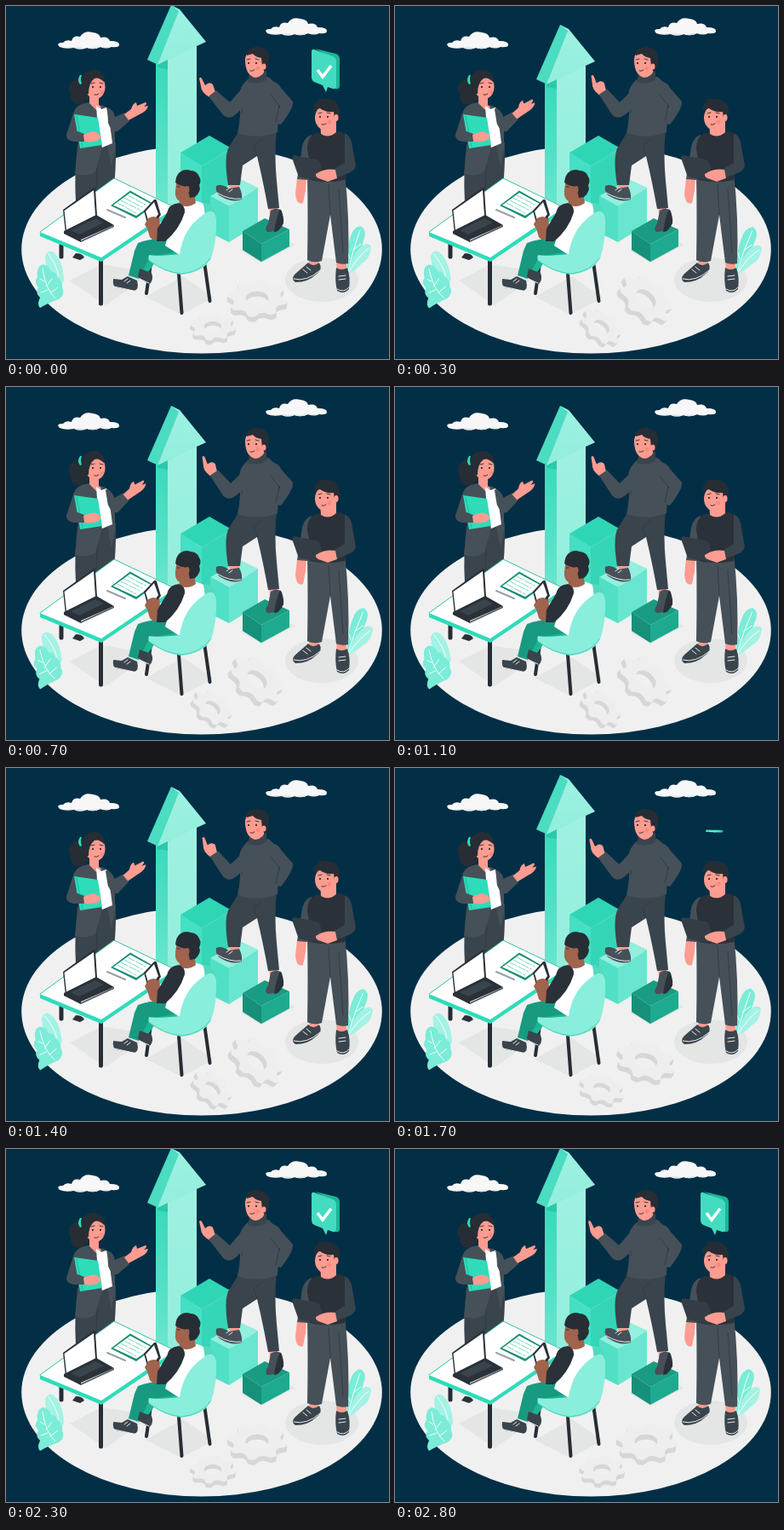
Write an HTML page that moves like this. It is 450 by 414 pixels and loops after 2900 ms.

```html
<!DOCTYPE html>
<html lang="en">
<head>
<meta charset="utf-8">
<style>
html, body { margin: 0; width: 100%; height: 100%; overflow: hidden; background: #022f46; }
svg { display: block; width: 450px; height: 414px; }
.skin { fill: #fd9c90; } .brown { fill: #a0634d; }
.hair { fill: #272d34; } .black { fill: #2a3138; }
.dark { fill: #3a444c; } .grey { fill: #465058; }
.white { fill: #fff; } .shade { fill: #e4e5e5; }
.teal { fill: #2edcba; } .light { fill: #a4f2e4; } .mid { fill: #7becd7; } .deep { fill: #1bb696; }
.line { fill: none; stroke: #272d34; stroke-width: .9; stroke-linecap: round; stroke-linejoin: round; }
.fold { fill: none; stroke: #303940; stroke-width: .8; }
.pale { stroke: #fff; } .green { stroke: #20b999; }
.leg { stroke-width: 4; } .post { stroke-width: 5; }
</style>
</head>
<body>
<svg viewBox="0 0 450 414">
  <defs>
    <linearGradient id="front" x1="0" y1="0" x2="0" y2="1"><stop stop-color="#9ff1e2"/><stop offset="1" stop-color="#92eedc"/></linearGradient>
    <linearGradient id="side" x1="0" y1="0" x2="0" y2="1"><stop stop-color="#38d9bb"/><stop offset=".5" stop-color="#50dfc4"/><stop offset="1" stop-color="#6de6cf"/></linearGradient>
    <g id="cloud">
      <path d="M3 18Q-2 13 7 13Q10 9 17 11Q19 4 27 6Q32-2 42 1Q50 2 51 7Q60 5 62 11Q74 11 73 16Q72 19 64 18Q58 21 51 18Q43 22 35 19Q27 22 20 19Q10 21 3 18Z" fill="#f7f7f7"/>
      <path d="M10 19Q22 17 34 19Q47 17 62 18Q55 20 51 18Q43 22 35 19Q27 22 20 19Z" fill="#e4e8ea"/>
    </g>
    <g id="face">
      <path class="line" d="M-7-6l4-1M3-7l4 1M-3 7q3 1 5-1"/>
      <circle cx="-5" cy="-2" r=".9"/><circle cx="4" cy="-2" r=".9"/>
      <circle cx="6" cy="4" r="2.4" fill="#f67d77" opacity=".6"/>
    </g>
  </defs>

  <ellipse cx="230" cy="285.500" rx="211.800" ry="122" fill="#f0f0f0"/>
  <g class="shade">
    <ellipse cx="371" cy="321" rx="43" ry="26"/>
    <path d="M75 322L112 303 172 312 117 351ZM164 341L208 317 244 342 206 362ZM276 287L300 301 340 280 328 274Z"/>
  </g>
  <use href="#cloud" x="60" y="30"/>
  <use href="#cloud" x="304" y="14"/>

  <g id="leftPlant">
    <path class="light" d="M46 293Q50 285 56 289Q67 298 68 322L58 337Q46 315 46 293Z"/>
    <path class="mid" d="M43 303Q51 304 53 312Q59 311 60 318Q67 322 66 330Q70 338 62 344Q52 347 40 354Q36 350 40 342Q34 337 38 330Q32 324 37 318Q35 306 43 303Z"/>
    <path class="line pale" d="M43 308Q46 332 58 343M45 323L40 320M47 329L54 320M49 333L41 336M52 337L61 330M50 291Q60 305 62 317"/>
  </g>
  <g id="rightPlant">
    <path class="mid" d="M401 313Q399 288 404 273Q407 260 416 258Q425 262 420 275Q416 296 401 313Z"/>
    <path class="light" d="M402 314Q406 294 415 284Q425 275 429 282Q428 297 418 302Q410 311 402 314Z"/>
    <path class="line pale" d="M402 311Q408 285 416 263M404 296L401 289M408 286L417 279M403 312Q413 294 426 284"/>
  </g>

  <!-- arrow and blocks -->
  <path id="shaftSide" fill="url(#side)"/><path id="shaft" fill="url(#front)"/>
  <g id="arrowHead">
    <path fill="#4bdcc1" d="M194-1L204 5 179 69 166 63Z"/>
    <path fill="url(#front)" d="M194-1L204 4 235 42 224 47 190 64 178 69 203 6Z"/>
    <path fill="#2bc9aa" d="M178 69L190 63 190 74 178 72Z"/>
  </g>
  <path fill="#2fd6b5" d="M205 172L239 152 265 167 230 188Z"/>
  <path fill="#45dfc3" d="M205 172L230 188V278L205 262Z"/>
  <path fill="#35d6b7" d="M230 188L265 167V260L230 278Z"/>
  <path fill="#93efde" d="M240 223L275 203 296 213 262 235Z"/>
  <path fill="#50e0c6" d="M240 223L262 235V277L240 266Z"/>
  <path fill="#69e6cf" d="M262 235L296 213V256L262 277Z"/>
  <path fill="#1a9c83" d="M278 264L304 249 333 262 300 279Z"/>
  <path fill="#169078" d="M278 264L300 279V300L278 286Z"/>
  <path fill="#1daa8e" d="M300 279L333 262V282L300 300Z"/>

  <!-- woman with folder -->
  <g>
    <path class="hair" d="M92 85Q80 83 75 92Q72 98 76 103Q75 112 82 115Q90 117 95 110L101 112 99 90Z"/>
    <path class="dark" d="M84 163L129 160Q130 190 125 230H82Q80 195 84 163Z"/>
    <path class="fold" d="M108 170L106 215"/>
    <path class="grey" d="M97 113Q82 115 79 126L71 151Q71 158 80 158L85 159 81 197Q96 201 105 194L113 166 107 116Z"/>
    <path class="skin" d="M98 103H109V116L118 122 106 122 98 114Z"/>
    <path class="grey" d="M111 116Q126 120 128 133L128 168 124 188Q119 165 117 150Z"/>
    <path class="white" d="M106 117L112 121 118 119Q123 140 125 161L113 166 108 145Z"/>
    <path class="teal" d="M80 127L108 131 113 163 87 167Z"/>
    <path class="line green" d="M83 129L90 165"/>
    <path class="grey" d="M71 150Q74 144 84 147L92 150 92 159 79 159Q70 157 71 150Z"/>
    <path class="skin" d="M91 151Q103 145 108 149L112 153Q109 161 92 159Z"/>
    <g id="womanArm">
      <path class="grey" d="M119 119Q127 122 128 130L140 125 145 135 131 147Q124 149 120 137Z"/>
      <path class="skin" d="M139 127L147 121Q149 114 153 113L154 117 164 113Q167 114 162 118L167 117Q166 123 157 127L144 134Z"/>
    </g>
    <ellipse class="skin" cx="105" cy="95" rx="11.500" ry="14"/>
    <path class="hair" d="M93 103Q84 83 95 77Q108 71 115 82Q117 87 115 89Q109 83 104 85Q97 90 97 103Z"/>
    <path class="teal" d="M87 81q-4 6 0 11l2-1q-2-5 0-10Z"/>
    <use href="#face" x="107" y="97"/>
  </g>

  <!-- table -->
  <path class="line post" d="M65 277V294M111.500 297V349"/>
  <path class="black" d="M82 290q8 0 10 5l-5 3-9-3Z"/>
  <path class="teal" d="M40 265L112 294 194 239V245L112 300 40 270Z"/>
  <path class="white" d="M40 265L127 202 199 236 112 295Z"/>
  <path class="line green" d="M40 265L127 202 198 236"/>
  <path class="black" d="M67 239L103 213Q105 212 105 215L107 246 70 267Z"/>
  <path class="white" d="M68.500 240L103 216 105 246 71 263Z"/>
  <path class="black" d="M68 264L106 245 127 257 88 274V277L68 267Z"/>
  <path d="M88 275L127 257V259L88 277Z" fill="#555f67"/>
  <path class="dark" d="M76 263L105 249 115 254 86 268Z"/>
  <path class="line" d="M119 239L140 248" style="stroke:#9aa0a6;stroke-width:2"/>
  <path fill="#188d76" d="M123 234L146 216.500 175 233 153 249Z"/>
  <path class="white" d="M126 233.500L146 219 172 233 153 246Z"/>
  <path class="line green" stroke-dasharray="9 2" style="stroke-width:.6" d="M143 222L164 233M139 225L160 236M135 228L157 239M131 231L153 243"/>

  <!-- seated man and chair -->
  <path class="line leg" d="M170 302L165 337M203 314L206.500 360M233 300L239.500 346"/>
  <path class="deep" d="M159 281Q170 271 207 274L211 293Q196 301 177 298L163 318 155 315Z"/>
  <path fill="#179a80" d="M155 278Q178 269 205 276L201 288 169 294 156 320 144 316 151 287Z"/>
  <path class="dark" d="M157 308L171 313Q174 321 169 326Q157 321 155 317ZM143 317L154 322Q157 333 150 334L129 330Q125 328 126 320L136 321Z"/>
  <path class="line pale" d="M127 329L150 334M157 320L168 325M139 323l4-3M142 325l4-3"/>
  <path class="white" d="M200 232Q218 224 232 232Q240 254 235 280L204 292 187 281Q194 260 194 244Z"/>
  <path class="brown" d="M201 202L219 208 223 231Q214 238 203 233L204 229Q198 226 199 216Z"/>
  <path class="brown" d="M166 261Q163 250 171 242L180 247 182 268Q175 279 169 271Z"/>
  <path class="black" d="M162 240L174 227Q176 226 177 228L182 245 168 262Z"/>
  <path class="white" d="M164 241L174 230 179 244 169 258Z"/>
  <path class="brown" d="M167 249q9-5 12 2l-6 12q-8-1-10-7Z"/>
  <path class="black" d="M203 231Q191 232 189 243L178 261 177 276 187 276Q204 262 210 242Q211 234 203 231Z"/>
  <path class="hair" d="M199 207Q200 198 204 195Q210 190 217 193Q224 193 227 200Q230 205 227 210Q230 217 222 224L216 225 213 212Q203 211 199 207Z"/>
  <ellipse class="brown" cx="213" cy="215" rx="2.500" ry="4"/>
  <path class="line" d="M201 212l3 0"/>
  <path fill="#52d9bf" d="M232 231Q246 230 247 250L243 257 234 247Z"/>
  <path fill="#89eedb" d="M168 292Q177 294 204 291Q208 262 230 246Q245 234 247 250Q248 275 241 296Q231 313 206 315Q186 313 170 300Q166 297 168 292Z"/>
  <path class="line" d="M169 299Q186 312 206 314Q229 312 240 296" style="stroke:#42cdb2"/>

  <!-- man on the blocks -->
  <g>
    <path class="skin" d="M262 205h12v9h-12ZM309 233h10v12h-9Z"/>
    <path class="dark" d="M274 146L318 144Q315 175 318 205L321 237 308 238Q302 205 295 176L278 187 275 210 261 210Q256 180 261 167Z"/>
    <path class="fold" d="M295 176L291 164 301 156"/>
    <path class="grey" d="M247 211Q253 208 262 214L274 212Q278 220 277 227Q266 231 254 224Q245 220 247 211Z"/>
    <path class="grey" d="M311 240Q318 235 324 240L326 254Q319 266 307 265Q303 262 308 255Z"/>
    <path class="black" d="M322 238Q327 246 326 255Q321 265 315 265Q317 250 322 238Z"/>
    <path class="line pale" d="M248 219Q263 228 276 226M259 216l4-3M262 218l4-3"/>
    <path class="grey" d="M310 88Q319 88 323 96L337 112Q338 120 323 139L314 137 322 117 311 106Z"/>
    <path class="grey" d="M284 86L308 83Q322 92 321 113L319 148Q296 157 272 149Q277 128 274 104Q275 94 284 86Z"/>
    <path class="fold" d="M311 104L321 117 317 136M276 103Q279 115 277 126"/>
    <g id="manArm">
      <path class="skin" d="M239 107Q229 101 229 94L227 85Q229 82 231 87L234 93Q239 88 243 92L246 101Z"/>
      <path class="grey" d="M276 98Q284 98 285 108Q277 123 266 130Q258 133 253 125L238 106 247 99 263 113Z"/>
    </g>
    <path class="dark" d="M286 81L306 76V87Q295 93 284 89Z"/>
    <path class="skin" d="M281 65Q280 52 296 52Q308 56 306 71Q303 83 293 84Q282 82 281 65Z"/>
    <path class="hair" d="M283 58Q281 48 296 48Q311 50 309 64Q308 72 304 78L301 71 300 61Q293 60 290 56Z"/>
    <ellipse class="skin" cx="303" cy="71" rx="2.500" ry="3.500"/>
    <use href="#face" x="290" y="69"/>
  </g>

  <!-- man with tablet -->
  <g>
    <path class="skin" d="M356 295h11v14h-11ZM388 298h12v16h-11Z"/>
    <path class="grey" d="M354 199L398 195Q404 250 402 302Q395 304 388 301L381 245 371 299Q362 302 354 298Q355 245 354 199Z"/>
    <path class="fold" d="M381 245L379 209M391 215L396 290"/>
    <path class="dark" d="M355 301Q361 307 368 301Q373 309 364 315Q355 324 340 324Q334 320 340 314ZM388 307Q394 311 401 307Q405 318 403 332Q397 339 389 334Q386 321 388 307Z"/>
    <path class="line pale" d="M338 320Q353 324 369 310M389 332Q397 337 403 330M349 309l5 4M353 306l5 4M391 317l8-1M391 321l8-1"/>
    <path class="skin" d="M342 202h11l-1 14-3 15q-8 3-9-11Z"/>
    <path class="grey" d="M359 151Q348 155 347 172L342 203 354 204 364 176Z"/>
    <path class="black" d="M364 149L393 147Q405 152 403 174L398 204Q373 209 355 203Q358 186 354 168Q354 153 364 149Z"/>
    <path class="skin" d="M369 134h19v14q-9 8-18 2Z"/>
    <path class="dark" d="M398 149Q406 153 407 165L411 187Q410 194 400 197L387 202 384 192 398 184Z"/>
    <path fill="#343d45" d="M338 175L365 180Q368 181 369 184L375 206 347 201Q344 200 343 198L336 178Z"/>
    <path class="skin" d="M387 192Q375 190 364 197Q363 201 370 203L378 206 389 202Z"/>
    <ellipse class="skin" cx="376" cy="131" rx="13" ry="15"/>
    <path class="hair" d="M361 122Q361 113 368 112L366 109Q386 107 391 117Q394 127 389 137L386 132 385 124Q375 125 369 120Z"/>
    <ellipse class="skin" cx="388" cy="131" rx="2.500" ry="4"/>
    <use href="#face" x="374" y="132"/>
  </g>

  <g id="bubble">
    <path class="deep" d="M363 50L388 56Q392 58 392 62V95Q391 98 387 97L382 60Z"/>
    <path fill="#43dcc0" d="M362 51L384 59Q388 61 388 65V95Q387 98 384 97L378 95 376 101 372 93 362 89Q359 87 359 84V54Q359 50 362 51Z"/>
    <path d="M366 75L372 83 382 70" fill="none" stroke="#fff" stroke-width="3.500"/>
  </g>
  <g id="bigGear"></g>
  <g id="smallGear"></g>
</svg>
<script>
const LOOP = 2900, MOVE = 280, RETURN = 1540, DROP = 23;
const el = id => document.getElementById(id);
const set = (id, name, value) => el(id).setAttribute(name, value);
const clamp = x => Math.min(1, Math.max(0, x));
const ease = x => x * x * (3 - 2 * x);

const ring = (rx, ry, teeth) => {
  const points = [];
  const count = teeth ? teeth * 4 : 32;
  for (let i = 0; i < count; i++) {
    const a = (i + .5) / count * Math.PI * 2;
    const r = teeth && i % 4 > 1 ? .8 : 1;
    points.push((Math.cos(a) * rx * r).toFixed(1) + ' ' + (Math.sin(a) * ry * r).toFixed(1));
  }
  return 'M' + points.join('L') + 'Z';
};

function buildGear(id, rx, ry, depth) {
  const d = ring(rx, ry, 8) + ring(rx * .38, ry * .38);
  let layers = '';
  for (let y = depth; y >= 0; y--) {
    const fill = y ? '#d6d7d7' : '#eeeeee';
    layers += `<path d="${d}" fill="${fill}" fill-rule="evenodd" transform="translate(0 ${y})"/>`;
  }
  el(id).innerHTML = layers;
}
buildGear('bigGear', 35.5, 22, 6);
buildGear('smallGear', 27, 16.5, 5);

function draw(t) {
  const leaving = ease(clamp(t / MOVE));
  const returning = ease(clamp((t - RETURN) / MOVE));
  const away = leaving - returning;
  const shown = 1 - away;
  const y = away * DROP;

  set('arrowHead', 'transform', `translate(0 ${y})`);
  set('shaft', 'd', `M190 ${y + 60}L224 ${y + 45}V240H190Z`);
  set('shaftSide', 'd', `M176 ${y + 68}L190 ${y + 62}V240L176 234Z`);
  set('bubble', 'transform', `translate(375 74) scale(${shown} ${clamp(shown * 2.4 - 1.4)}) translate(-375 -74)`);
  set('bigGear', 'transform', `translate(295 343) rotate(${away * 40})`);
  set('smallGear', 'transform', `translate(243 376) rotate(${away * 40})`);
  set('leftPlant', 'transform', `rotate(${-4 * away} 46 353)`);
  set('rightPlant', 'transform', `rotate(${4 * away} 402 313)`);
  set('womanArm', 'transform', `rotate(${-6 * away} 129 140)`);
  set('manArm', 'transform', `rotate(${5 * away} 264 124)`);
}

function frame(now) {
  draw(now % LOOP);
  requestAnimationFrame(frame);
}
draw(0);
requestAnimationFrame(frame);
</script>
</body>
</html>
```
